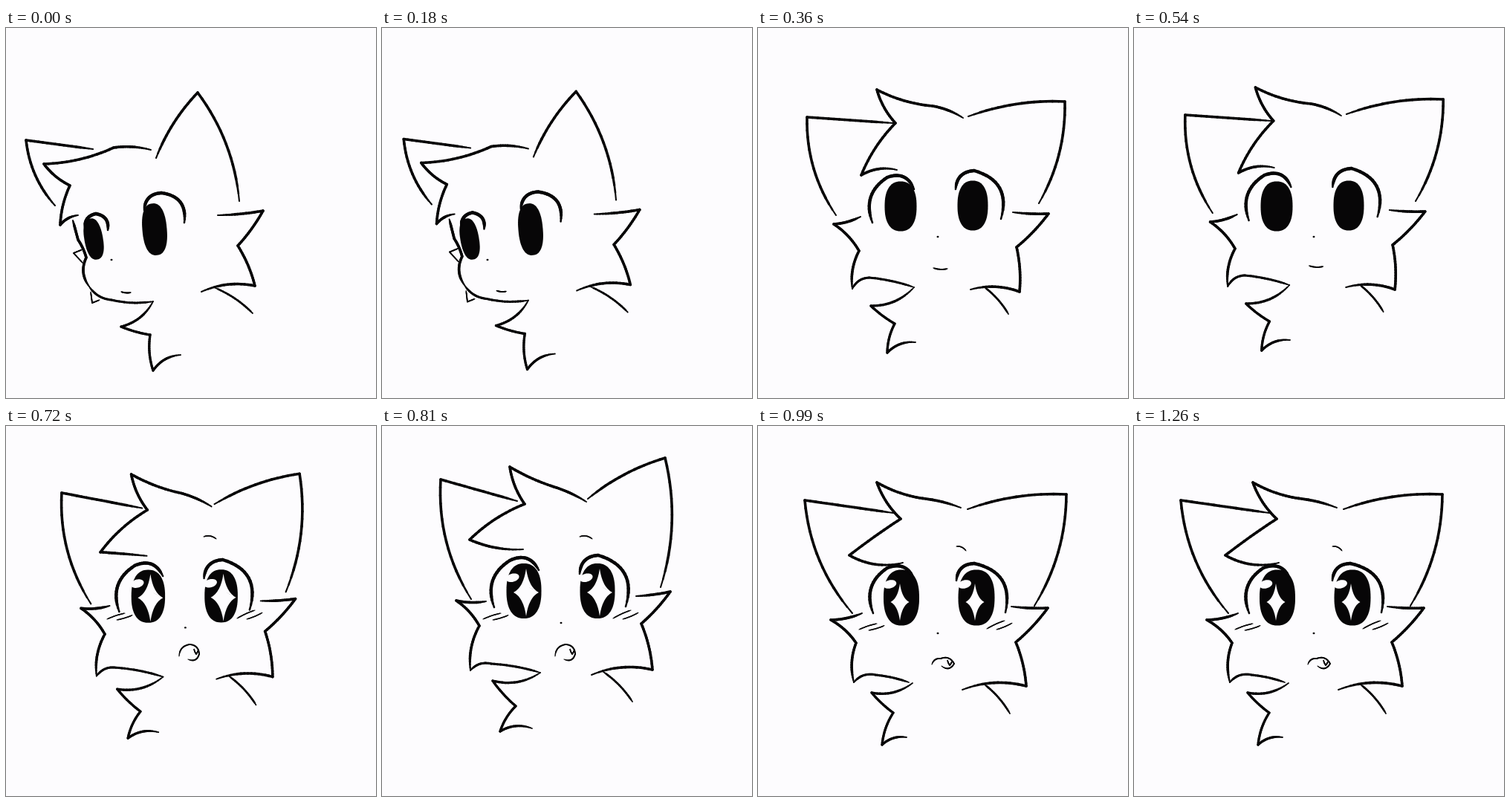
Recreate the animation shown at these times as an HTML page with a canvas. Size 498 by 498 pixels, loop 1350 ms.

```html
<!DOCTYPE html>
<html lang="en">
<head>
<meta charset="utf-8">
<title>Cat turning its head</title>
<style>
  html, body { margin: 0; width: 100%; height: 100%; overflow: hidden; background: #fdfcfe; }
  canvas { display: block; width: 498px; height: 498px; }
</style>
</head>
<body>
<canvas id="stage" width="498" height="498"></canvas>
<script>
const ctx = document.getElementById('stage').getContext('2d');
const PAPER = '#fdfcfe', INK = '#070607', STEP = 90, COUNT = 15;

// How far each stretch between two corners bows out, as a share of its length.
const bows = {
  earL: [0, -.08], earR: [.05, .07], hair: [-.05, .05, -.06, -.05, .1],
  cheekR: [-.02, .03, .04, -.08], cheekL: [.05, .06, -.08], jaw: [.15, .03],
  chest: [.11, -.03, -.06, .12], back: [.05], lashL: [.2, .24], lashR: [.22, .25],
  lip: [-.07], mouth: [.2, .22, .28], brow: [.14], fang: [-.05, -.05],
  tuftA: [0, 0], tuftB: [0, 0]
};
const widths = { lashL: 4.4, lashR: 4.4, jaw: 3, chest: 3.3, back: 2.7, lip: 1.9,
  mouth: 1.9, brow: 1.6, fang: 1.6, tuftA: 1.8, tuftB: 1.8 };

const pairs = s => s.split(', ').map(p => p.split(' ').map(Number));
const key = (lines, face, bend) => ({
  ...face,
  lines: Object.fromEntries(Object.entries(lines).map(([k, s]) => [k, pairs(s)])),
  bows: { ...bows, ...bend }
});
const eye = (x, y, rx, ry, tilt = 0) => ({ x, y, rx, ry, tilt });

const side = key({
  earL: '117 163, 27 151, 66 239',
  hair: '195 164, 145 161, 51 183, 86 212, 73 265, 97 252',
  earR: '202 175, 258 87, 314 233',
  cheekR: '285 252, 346 246, 312 293, 335 347, 263 355',
  back: '282 350, 332 384',
  cheekL: '90 259, 97 285, 108 309, 112 348',
  jaw: '112 348, 142 366, 198 368',
  chest: '198 368, 155 402, 194 413, 198 461, 235 440',
  lashL: '106 268, 121 250, 137 272',
  lashR: '186 245, 209 222, 240 262',
  lip: '155 355, 168 356',
  tuftA: '103 298, 91 303, 104 317',
  tuftB: '114 355, 116 370, 126 366'
}, { eyes: [eye(118, 284, 12.5, 28, -10), eye(200, 271, 16.5, 35, -5)], nose: [142, 312] },
{ jaw: [-.12, -.05], cheekL: [0, .04, -.15] });

const front = key({
  earL: '182 128, 66 120, 105 252',
  hair: '276 121, 235 105, 160 83, 185 128, 139 198, 187 191',
  earR: '283 119, 413 99, 378 236',
  cheekR: '343 248, 391 250, 348 295, 352 355, 286 352',
  back: '305 349, 337 385',
  cheekL: '138 254, 102 264, 136 300, 127 351',
  jaw: '127 351, 150 336, 210 349',
  chest: '210 349, 152 374, 184 398, 174 437, 212 423',
  lashL: '154 262, 174 201, 210 217',
  lashR: '266 217, 291 192, 327 257',
  lip: '236 323, 255 324'
}, { eyes: [eye(192, 240, 21.5, 33.5), eye(289, 239, 20.5, 33.5)], nose: [242, 281] });

const amazed = key({
  earL: '182 101, 79 72, 120 233',
  hair: '275 102, 235 83, 172 55, 192 105, 118 153, 190 166',
  earR: '277 98, 381 43, 375 217',
  cheekR: '342 229, 388 223, 349 266, 364 328, 282 335',
  back: '298 331, 337 371',
  cheekL: '140 236, 100 235, 131 269, 119 329',
  jaw: '119 329, 147 320, 213 332',
  chest: '213 332, 149 343, 180 377, 159 411, 202 407',
  lashL: '151 244, 172 181, 211 194',
  lashR: '266 199, 291 174, 328 243',
  mouth: '233 310, 247 294, 260 307, 245 314',
  fang: '253 300, 256 307, 259 301',
  brow: '266 149, 283 152'
}, { eyes: [eye(191, 222, 23.5, 37), eye(290, 222, 23.5, 37)], nose: [241, 265],
  star: [3, 2, 17, 32], blush: [[136, 260], [311, 259]] },
{ hair: [-.03, .03, -.06, -.05, -.06] });

const settled = key({
  earL: '182 117, 63 100, 127 252',
  hair: '273 110, 226 98, 160 76, 192 125, 123 174, 195 184',
  earR: '282 112, 415 92, 372 242',
  cheekR: '341 243, 390 245, 347 291, 361 350, 275 355',
  back: '305 348, 339 387',
  cheekL: '140 252, 98 261, 132 292, 129 345',
  jaw: '129 345, 158 335, 203 345',
  chest: '208 346, 153 359, 182 386, 167 429, 200 419',
  lashL: '155 252, 174 191, 210 206',
  lashR: '267 208, 291 185, 333 251',
  mouth: '234 321, 246 313, 264 320, 247 323',
  fang: '255 315, 258 322, 261 317',
  brow: '267 162, 280 168'
}, { eyes: [eye(193, 231, 24, 37.5), eye(294, 231, 24.5, 37.5)], nose: [242, 279],
  star: [-2, 6, 12.5, 25], blush: [[136, 274], [308, 273]] },
{ hair: [-.03, .05, -.06, -.01, -.1] });

// Blends anything built of numbers, keeping only the parts that b has.
function mix(a, b, t) {
  if (typeof b === 'number') return a + (b - a) * t;
  if (a === undefined || a.length !== b.length) return b;
  if (Array.isArray(b)) return b.map((v, i) => mix(a[i], v, t));
  return Object.fromEntries(Object.keys(b).map(k => [k, a[k] === undefined ? b[k] : mix(a[k], b[k], t)]));
}

// Small sway: the top of the head leans right and everything rises.
const lean = (pose, skew, lift) => {
  const move = ([x, y]) => [x - skew * (y - 300), y - lift];
  const lines = Object.fromEntries(Object.entries(pose.lines).map(([k, ps]) => [k, ps.map(move)]));
  return { ...pose, lines };
};

const sideLift = lean(side, .015, 1.5), frontLift = lean(front, .016, 3);

// One drawing per step; the last one is held until the loop restarts.
const drawings = [
  side, mix(side, sideLift, .5), sideLift, mix(sideLift, front, .5),
  front, mix(front, frontLift, .5), frontLift, { ...frontLift, squash: true },
  mix(frontLift, amazed, .6), amazed, mix(amazed, settled, .6), settled
];

function curve([x0, y0], [x1, y1], bow, widthAt) {
  const cx = (x0 + x1) / 2 + 2 * bow * (y1 - y0);
  const cy = (y0 + y1) / 2 - 2 * bow * (x1 - x0);
  const quad = (a, c, b, t) => (1 - t) ** 2 * a + 2 * t * (1 - t) * c + t * t * b;
  const parts = 16;
  for (let i = 0; i < parts; i++) {
    ctx.lineWidth = widthAt((i + .5) / parts);
    ctx.beginPath();
    for (const t of [i / parts, (i + 1) / parts]) ctx.lineTo(quad(x0, cx, x1, t), quad(y0, cy, y1, t));
    ctx.stroke();
  }
}

// Pen line that thins out at both ends.
function stroke(points, bend, width) {
  const n = points.length - 1;
  for (let i = 0; i < n; i++) {
    curve(points[i], points[i + 1], bend[i], t => {
      const u = (i + t) / n;
      return width * Math.min(1, .5 + 5 * Math.min(u, 1 - u));
    });
  }
}

function oval({ x, y, rx, ry, tilt = 0 }, color, power = 1) {
  const bend = v => Math.sign(v) * Math.abs(v) ** power;
  ctx.save();
  ctx.translate(x, y);
  ctx.rotate(tilt * Math.PI / 180);
  ctx.beginPath();
  for (let a = 0; a < 2 * Math.PI; a += Math.PI / 36) {
    ctx.lineTo(rx * bend(Math.cos(a)), ry * bend(Math.sin(a)));
  }
  ctx.fillStyle = color;
  ctx.fill();
  ctx.restore();
}

function sparkle(x, y, rx, ry) {
  ctx.beginPath();
  for (let i = 0; i <= 4; i++) {
    const a = i * Math.PI / 2, b = a - Math.PI / 4;
    ctx.quadraticCurveTo(x + rx * .3 * Math.cos(b), y + ry * .3 * Math.sin(b),
      x + rx * Math.cos(a), y + ry * Math.sin(a));
  }
  ctx.fillStyle = PAPER;
  ctx.fill();
}

function drawEye(e, star) {
  oval(e, INK, .84);
  if (!star) return;
  const [dx, dy, rx, ry] = star;
  sparkle(e.x + dx, e.y + dy, rx, ry);
  oval({ x: e.x - .65 * e.rx, y: e.y - .48 * e.ry, rx: 9, ry: 5.5, tilt: -15 }, PAPER);
}

function drawBlush([x, y], rise) {
  stroke([[x, y], [x + 24, y - rise]], [.03], 1.6);
  stroke([[x + 13, y + 1], [x + 34, y + 1 - rise * .8]], [-.03], 1.6);
}

function draw(pose) {
  ctx.setTransform(1, 0, 0, 1, 0, 0);
  ctx.fillStyle = PAPER;
  ctx.fillRect(0, 0, 498, 498);
  if (pose.squash) ctx.setTransform(1.09, 0, 0, .93, -21.7, 44.5);
  ctx.strokeStyle = INK;
  ctx.lineCap = 'round';
  pose.eyes.forEach(e => drawEye(e, pose.star));
  for (const [k, points] of Object.entries(pose.lines)) stroke(points, pose.bows[k], widths[k] || 3.6);
  (pose.blush || []).forEach((p, i) => drawBlush(p, 8 + 3 * i));
  oval({ x: pose.nose[0], y: pose.nose[1], rx: 1.5, ry: 1.2 }, INK);
}

let shown = -1;
function tick() {
  const step = Math.floor(performance.now() / STEP) % COUNT;
  if (step !== shown) draw(drawings[Math.min(shown = step, drawings.length - 1)]);
  requestAnimationFrame(tick);
}
tick();
</script>
</body>
</html>
```
